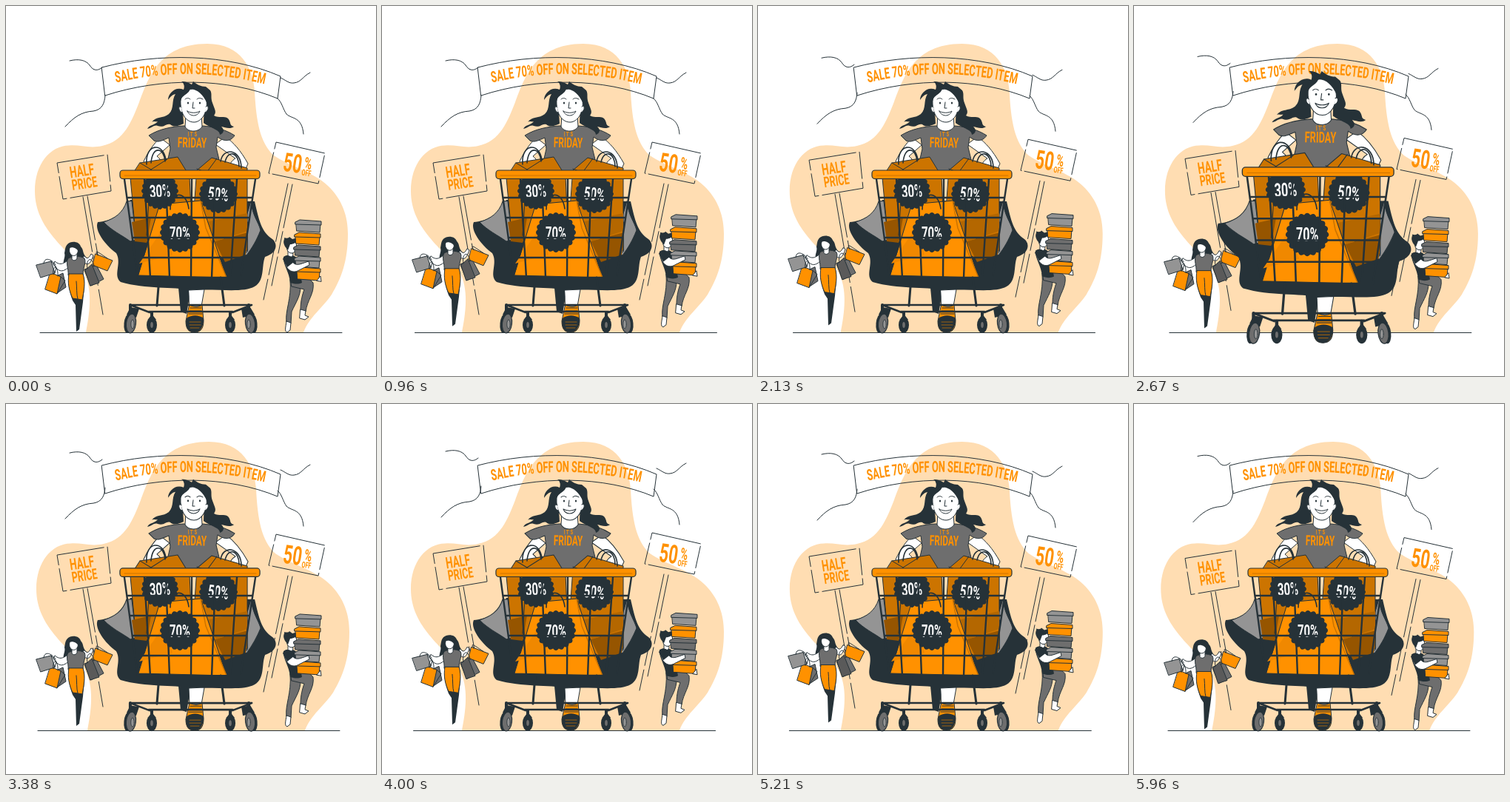
Write an HTML page with a canvas that moves like this. It is 500x500 px and loops after 6000 ms.

```html
<!DOCTYPE html>
<html lang="en">
<head>
<meta charset="utf-8">
<title>Sale</title>
<style>
html, body { margin: 0; width: 100%; height: 100%; overflow: hidden; background: #fff; }
canvas { display: block; width: 500px; height: 500px; }
</style>
</head>
<body>
<canvas id="stage"></canvas>
<script>
const INK = '#263238', ORANGE = '#ff9100', AMBER = '#cc7400', BROWN = '#965500';
const GREY = '#6e6e6e', PALE = '#949494', PEACH = '#ffddb2', WHITE = '#fff';
const LOOP = 6000, NARROW = 0.62;
const canvas = document.getElementById('stage');
const ctx = canvas.getContext('2d');
const dpr = window.devicePixelRatio || 1;
canvas.width = canvas.height = 500 * dpr;

const cache = new Map();
function draw(d, fill, stroke, width = 1) {
  if (!cache.has(d)) cache.set(d, new Path2D(d));
  const p = cache.get(d);
  if (fill) { ctx.fillStyle = fill; ctx.fill(p); }
  if (stroke) { ctx.strokeStyle = stroke; ctx.lineWidth = width; ctx.stroke(p); }
}
function oval(x, y, rx, ry, fill, stroke, width = 1, turn = 0) {
  ctx.beginPath();
  ctx.ellipse(x, y, rx, ry, turn, 0, Math.PI * 2);
  if (fill) { ctx.fillStyle = fill; ctx.fill(); }
  if (stroke) { ctx.strokeStyle = stroke; ctx.lineWidth = width; ctx.stroke(); }
}
function group(fn, dx = 0, dy = 0, scale = 1, px = 0, py = 0) {
  ctx.save();
  ctx.translate(px + dx, py + dy);
  ctx.scale(scale, scale);
  ctx.translate(-px, -py);
  fn();
  ctx.restore();
}
function dashed(d, dash) {
  ctx.setLineDash(dash);
  draw(d, null, INK);
  ctx.setLineDash([]);
}

// All lettering shares one condensed style.
function setFont(size) {
  ctx.font = `700 ${size}px Roboto, "Liberation Sans", sans-serif`;
}
function letters(str, x, y, size, color, turn = 0) {
  ctx.save();
  ctx.translate(x, y);
  ctx.rotate(turn);
  ctx.scale(NARROW, 1);
  setFont(size);
  ctx.fillStyle = color;
  ctx.textAlign = 'center';
  ctx.textBaseline = 'alphabetic';
  ctx.fillText(str, 0, size * 0.355);
  ctx.restore();
}
function arcLetters(str, x, size, color, yAt) {
  for (const ch of str) {
    setFont(size);
    const w = ctx.measureText(ch).width * NARROW;
    x += w / 2;
    const slope = (yAt(x + 1) - yAt(x - 1)) / 2;
    letters(ch, x, yAt(x), size, color, Math.atan(slope) * 0.8);
    x += w / 2;
  }
}

// Standard "ease" curve, solved by bisection.
function ease(x) {
  let lo = 0, hi = 1;
  for (let i = 0; i < 20; i++) {
    const s = (lo + hi) / 2, r = 1 - s;
    if (0.75 * s * r * r + 0.75 * s * s * r + s * s * s < x) lo = s; else hi = s;
  }
  const r = 1 - lo;
  return 0.3 * lo * r * r + 3 * lo * lo * r + lo ** 3;
}
function keyed(p, keys) {
  for (let i = 1; i < keys.length; i++) {
    const [a, u] = keys[i - 1], [b, v] = keys[i];
    if (p <= b) return u + (v - u) * ease((p - a) / (b - a));
  }
  return keys[keys.length - 1][1];
}
const phase = (t, delay, period) => t < delay ? 0 : (t - delay) / period % 1;
const float = p => -10 * (1 - Math.abs(1 - 2 * p));

const SHAKE = [0, -1, 2, -4, 4, -4, 4, -4, 2, -1, 0].map((x, i) => [i / 10, x]);
const BEAT = [[0, 1], [0.1, 1.1], [0.2, 1], [0.4, 1], [0.5, 1.1], [0.6, 1], [1, 1]];

function blob() {
  draw('M108 441C113 415 118 382 104 358C84 328 39 302 39 250C39 213 60 189 85 188.500C100 187 112 193 130 189C160 183 170 155 180 130C192 100 205 51 272 51C318 51 334 85 336 115C338 155 343 185 362 202C382 216 415 224 435 243C455 262 462 285 462 308C462 345 453 368 440 390C428 408 410 420 402 441Z', PEACH);
}

function banner(lift) {
  draw('M129.500 83C205 63 300 64 371 95L367 125C300 97 210 96 134 121Z', null, INK);
  group(() => {
    draw('M86 74C98 71 108 73 113 80C118 88 124 88 130 83M134 121C133 132 130 140 118 142C102 143 92 150 80 163', null, INK);
    draw('M411 90C401 95 399 103 389 104C382 105 378 100 371 97M367 125C373 130 374 139 379 146C386 153 400 149 402 173', null, INK);
  }, 0, lift);
  arcLetters('SALE 70% OFF ON SELECTED ITEM', 147, 20.8, ORANGE, x => 84.5 + 0.00125 * (x - 245) ** 2);
}

function signs(lift) {
  group(() => {
    dashed('M69 212L137 201L142 250L77 261Z', [64, 5, 36, 5]);
    dashed('M104 258L131 417', [75, 6, 40, 6]);
    dashed('M110 257L125 342', [60, 5]);
    letters('HALF', 102.500, 222.500, 21.500, ORANGE, -0.15);
    letters('PRICE', 106, 239.500, 20, ORANGE, -0.15);
    dashed('M365 184L431 199L422 240L355 226Z', [67, 4, 30, 5]);
    dashed('M381 240L348 397', [80, 6, 40, 6]);
    dashed('M387 241L359 378', [60, 5, 30, 5]);
    letters('50', 387.500, 212, 35, ORANGE, 0.15);
    letters('%', 408.500, 212.500, 22, ORANGE, 0.15);
    letters('OFF', 406, 225.500, 11.500, ORANGE, 0.15);
  }, 0, lift);
}

function skirtAndLegs() {
  draw('M168 262C160 282 140 291 124 292C119 303 134 323 149 334C157 348 144 364 155 373C190 383 225 379 250 384C290 382 320 388 336 379C350 371 345 352 350 339C366 334 368 322 360 315C345 305 342 290 336 264Z', INK);
  draw('M163 264C158 280 147 287 132 292C142 303 157 310 168 318L176 316L170 264Z', PALE, INK);
  draw('M331 264C333 284 341 291 344 303C338 318 333 326 325 337L312 330Z', PALE, INK);
  draw('M233 381L250 381L244 416L236 413Z', INK);
  draw('M247 384L268 383L264 406L248 406Z', WHITE, INK);
  draw('M248 404C254 407 260 407 265 404L267 425C267 438 261 441 255 441C247 441 243 437 243 426Z', ORANGE, INK);
  draw('M244 422C251 417 260 417 267 422L267 427C265 438 260 441 255 441C247 441 243 436 243 426Z', INK);
  draw('M249 408L264 408M248 412L264 412M247 416L265 416', null, INK);
  draw('M248 427L263 427M248 431L263 431M249 435L261 435', null, AMBER, 0.7);
}

function torso() {
  draw('M208 178C201 185 193 195 186 210L195 222L214 222C212 212 208 206 204 203L221 188Z', WHITE, INK);
  draw('M297 177C307 184 317 195 327 213L322 224L300 222C301 214 306 208 310 206L283 187Z', WHITE, INK);
  draw('M239 162C225 163 207 166 193 175L200 182C207 185 212 181 220 178L222 193L215 224L292 224L284 191L286 177C294 183 303 184 309 175C297 167 281 163 266 162Z', GREY, INK);
  letters('I T\' S', 252, 173, 9, ORANGE, -0.03);
  letters('FRIDAY', 251.500, 184.500, 19, ORANGE, 0.02);
}

function head() {
  draw('M240 113C242 108 240 104 237 102C244 102 247 104 251 106L253 102C258 106 263 109 270 109L276 114C279 119 276 123 279 131C282 140 285 143 281 148C288 152 295 148 300 152C305 158 301 161 308 163C303 167 296 164 291 163C296 168 294 172 289 174C289 167 278 166 267 158L268 128L238 128L240 159C231 163 227 164 222 160C216 158 214 165 205 162C200 160 197 165 191 166C194 160 202 161 205 156C201 157 199 155 197 157C202 149 213 152 220 146C228 138 223 128 229 119C224 120 222 123 219 127C219 118 229 108 240 113Z', INK);
  draw('M243 147L242 163C246 171 260 171 265 163L264 147Z', WHITE, INK);
  draw('M236 127C238 116 247 111 256 112C265 112 270 118 271 128C273 142 265 157 254 157C242 157 235 143 236 127Z', WHITE, INK);
  draw('M237 137C233 133 232 142 238 144M270 136C274 133 275 141 269 144', WHITE, INK);
  draw('M235 133C235 120 246 121 249 112C259 113 266 119 272 132C274 114 263 108 253 108C242 109 232 117 235 133Z', INK);
  draw('M242 126C244 124 247 124 249 126M258 126C260 124 263 124 266 126M253 130L252 138L255 138', null, INK);
  oval(246, 131, 1.1, 1.5, INK);
  oval(262, 131, 1.1, 1.5, INK);
  draw('M245 142C249 145 258 145 262 142C259 150 248 150 245 142Z', WHITE, INK);
}

function badge(x, y, r, str, turn) {
  const n = 20;
  ctx.beginPath();
  for (let i = 0; i <= 120; i++) {
    const a = i / 120 * Math.PI * 2;
    const k = r - 2.2 + 2.2 * Math.abs(Math.cos(a * n / 2));
    ctx.lineTo(x + k * Math.cos(a), y + k * Math.sin(a));
  }
  ctx.fillStyle = INK;
  ctx.fill();
  letters(str, x, y, 24, WHITE, turn);
}

function bags() {
  draw('M181 212L232 204L248 230L252 322L176 318L168 232Z', AMBER, INK);
  draw('M170 292L196 286L190 320L174 318Z', BROWN);
  draw('M181 212L196 221L218 207M196 221L190 310', null, INK);
  draw('M258 222L278 205L326 219L326 330L298 345L252 310Z', AMBER, INK);
  draw('M258 220L271 225L285 206M326 292L285 322L300 345L326 332Z', null, INK);
  draw('M282 318L327 306L324 336L296 346Z', BROWN);
  draw('M270 292L326 280L326 304L284 318Z', '#b46700');
  draw('M208 268L263 263L298 367L179 364Z', ORANGE, INK);
  draw('M180 348L213 300L225 336Z', '#f08800');
  draw('M263 263L270 300L298 367', null, AMBER, 1.5);
  draw('M190 214C188 185 213 184 216 208M196 212C198 187 214 192 215 210M290 210C293 190 318 193 318 219M296 211C300 193 315 198 315 217M222 275C222 249 244 249 247 274', null, INK, 1.6);
  badge(208, 250, 25, '30%', -0.06);
  badge(287, 254, 26, '50%', 0.12);
  badge(235, 306, 27, '70%', 0);
}

function wheel(x, y, rx, ry, front) {
  const side = x < 250 ? 1 : -1;
  if (front) {
    oval(x - 3 * side, y, rx - 2, ry, INK, null, 1, 0.1 * side);
    oval(x + side, y, rx - 1, ry, GREY, INK, 1.2, 0.12 * side);
    oval(x + 3 * side, y + 1, 2.2, 6, PALE, INK, 0.8);
  } else {
    oval(x, y, rx, ry, INK);
    oval(x, y, 1.8, 4, GREY);
  }
}

function cart() {
  const wires = [];
  for (const [a, b] of [[160, 178], [187, 195], [216, 221], [251, 250], [283, 278], [312, 303], [337, 317]])
    wires.push(`M${a} 234L${b} 367`);
  for (let i = 1; i <= 5; i++) {
    const y = 232 + i * 27, k = (y - 234) / 133;
    wires.push(`M${160 + 18 * k} ${y}L${337 - 20 * k} ${y}`);
  }
  draw(wires.join(''), null, INK, 2.4);
  draw('M207 367L204 405M290 367L295 405', null, INK, 3);
  draw('M168 404L332 404M193 413L306 413M168 404L194 414M332 404L306 414', null, INK, 2.6);
  draw('M168 404L168 420M197 414L197 424M303 414L303 424M328 404L328 420', null, INK, 4);
  draw('M163 417L168 407L180 409L176 421ZM192 424L197 416L203 424ZM298 424L303 416L309 424ZM320 421L318 409L330 407L336 417Z', INK);
  wheel(197, 431, 7, 11, false);
  wheel(303, 431, 7, 11, false);
  wheel(168, 429, 7.5, 13, true);
  wheel(331, 429, 7.5, 13, true);
  ctx.beginPath();
  ctx.roundRect(154, 222, 189, 11.5, 4);
  ctx.fillStyle = ORANGE;
  ctx.fill();
  ctx.strokeStyle = INK;
  ctx.lineWidth = 1.2;
  ctx.stroke();
  draw('M160 229L338 229', null, AMBER, 1);
}

function shopper() {
  draw('M83 322C88 317 99 318 101 325C106 330 102 335 111 342L106 342L108 346L100 343C92 347 82 344 79 352C75 346 81 340 79 334C80 329 80 325 83 322Z', INK);
  draw('M86 342C79 347 74 352 66 345L64 349C73 363 79 358 87 351ZM103 341C107 351 113 353 118 337L115 335C111 343 109 341 106 338Z', WHITE, INK);
  draw('M84 341C90 338 99 337 106 341C109 347 104 352 104 364L84 364C85 355 80 348 84 341Z', GREY, INK);
  draw('M86 362L104 362C108 372 105 387 104 400L99 437L95 440L94 404L90 398C85 384 83 374 86 362Z', INK);
  draw('M85 362L104 362C108 374 105 386 103 397L90 395C85 384 83 374 85 362Z', ORANGE, INK);
  draw('M95 372C96 380 95 390 97 396', null, INK);
  draw('M89 335L89 342C91 345 95 344 96 341L96 334Z', WHITE, INK);
  oval(91.5, 330, 6, 7.5, WHITE, INK);
  draw('M84 330C86 324 95 326 98 332C99 324 94 320 90 320C86 321 82 325 84 330Z', INK);
  draw('M62 368L77 361L81 380L69 388Z', GREY, INK);
  draw('M60 360L74 366L69 389L53 383Z', ORANGE, INK);
  draw('M41 350L61 345L66 361L47 367Z', PALE, INK);
  draw('M61 345L68 353L66 361M74 366L80 371L69 389', null, INK);
  draw('M51 348C52 337 64 344 67 350M64 363C62 350 71 349 70 365', null, INK);
  draw('M106 356L122 350L132 369L115 378Z', GREY, INK);
  draw('M107 357L116 349L126 374L114 378Z', '#5a5a5a', INK);
  draw('M121 335L144 344L137 358L117 350Z', ORANGE, INK);
  draw('M124 337C118 327 126 334 137 341M110 355C107 341 117 337 119 352', null, INK);
}

function box(x, y, w, h, fill) {
  draw(`M${x} ${y}L${x + w} ${y + 2}L${x + w - 1} ${y + h}L${x + 1} ${y + h - 2}Z`, fill, INK);
  draw(`M${x - 1} ${y}L${x + 5} ${y - 3}L${x + w + 1} ${y - 1}L${x + w + 1} ${y + 4}L${x - 1} ${y + 3}Z`, fill, INK);
}

function carrier() {
  draw('M384 370L398 379C398 392 392 400 386 413L385 429L379 427C377 412 386 396 384 370Z', GREY, INK);
  draw('M379 426L385 428L384 438L380 441C376 440 378 434 379 426Z', WHITE, INK);
  draw('M384 361C394 359 407 365 415 374C417 389 407 397 405 413L398 411C398 398 401 389 403 383L386 379Z', GREY, INK);
  draw('M398 410L405 412L404 418L409 420L404 424L397 422Z', WHITE, INK);
  draw('M375 339C382 335 390 336 394 342L400 374C394 377 388 375 384 374C383 359 374 350 375 339Z', INK);
  draw('M381 331L381 337C384 341 388 339 388 335Z', WHITE, INK);
  draw('M380 320L391 318C395 326 391 335 385 334C380 333 378 327 380 320Z', WHITE, INK);
  draw('M377 325C373 317 377 316 376 313C379 314 382 314 383 312L387 315L394 313C394 320 388 322 384 322L381 330Z', INK);
  const stack = [[392, 292, 33, 14, PALE], [391, 309, 33, 14, ORANGE], [390, 326, 34, 13, GREY],
                 [391, 341, 33, 13, PALE], [393, 356, 31, 15, ORANGE]];
  for (const part of stack.reverse()) box(...part);
  draw('M376 344C378 355 386 363 396 357L410 350L409 345L400 348C392 351 388 349 385 342Z', WHITE, INK);
  draw('M374 342C376 335 388 335 389 346L380 353Z', INK);
  draw('M420 371L425 365L426 372Z', WHITE, INK);
}

function render(t) {
  ctx.setTransform(dpr, 0, 0, dpr, 0, 0);
  ctx.fillStyle = WHITE;
  ctx.fillRect(0, 0, 500, 500);
  ctx.lineJoin = ctx.lineCap = 'round';
  const quick = phase(t, 0, 1500);
  const hop = float(quick);
  const lift = float(phase(t, 1000, 6000));
  const zoom = keyed(phase(t, 1000, 1500), BEAT);

  group(blob, keyed(phase(t, 1000, 3000), SHAKE));
  banner(lift);
  signs(lift);
  group(() => draw('M46 441.500L454 441.500', null, INK), keyed(quick, SHAKE));
  group(shopper, 0, hop);
  group(carrier, 0, hop);
  group(() => {
    skirtAndLegs();
    torso();
    head();
    bags();
    cart();
  }, 0, 0, zoom, 246, 271);
}

const start = performance.now();
function tick() {
  render((performance.now() - start) % LOOP);
  requestAnimationFrame(tick);
}
tick();
</script>
</body>
</html>
```
